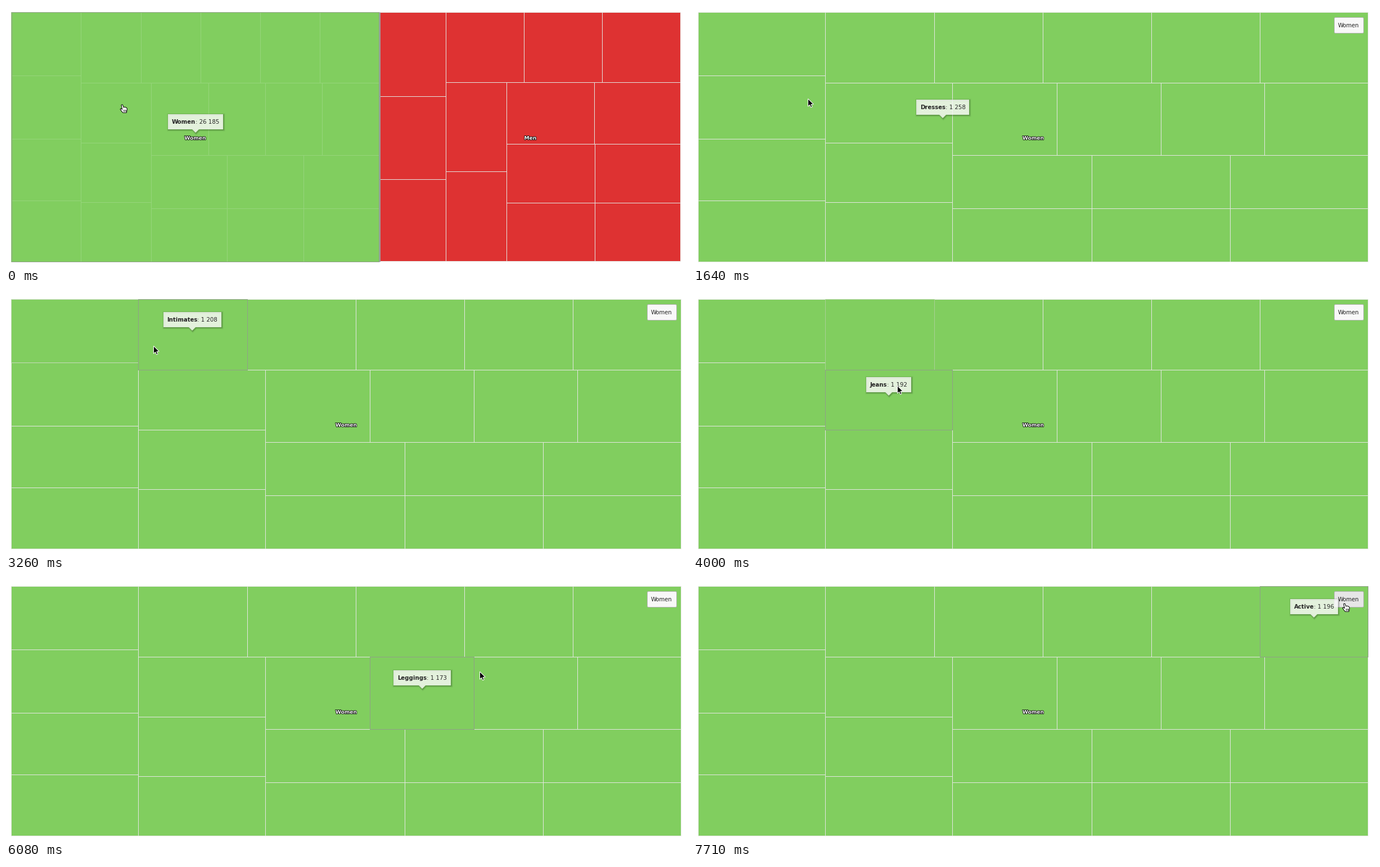
Recreate the animation shown at these times as a matplotlib script. Size 1211 by 462 pixels, loop 8 s.

```python
import numpy as np
import matplotlib.pyplot as plt
from matplotlib.animation import FuncAnimation
from matplotlib.collections import PolyCollection
from matplotlib.colors import to_rgba
from matplotlib.patches import FancyBboxPatch, Polygon
from matplotlib.patheffects import withStroke

W, H, DPI = 1211, 462, 64
PX = 72 / DPI
LOOP, INTERVAL, STEPS = 8000, 40, 54
DRILL, MOVE, PRESS = 5, 11, 50

GREEN, RED = "#81ce5f", "#de3232"
LIGHT, FAINT, HOVER, FADE = "#e4e6e2", "#96d57b", "#8f9f88", "#8ac36e"


def treemap(x, y, w, h, values, strips):
    """Cut strips off a rectangle: columns for n > 0, rows for n < 0."""
    out, values = [], list(values)
    for n in strips:
        part, rest = values[:abs(n)], values[abs(n):]
        share = sum(part) / sum(values)
        ends = np.cumsum([0] + part) / sum(part)
        if n > 0:
            cut = w * share
            out += [(x, y + a * h, x + cut, y + b * h)
                    for a, b in zip(ends, ends[1:])]
            x, w = x + cut, w - cut
        else:
            cut = h * share
            out += [(x + a * w, y, x + b * w, y + cut)
                    for a, b in zip(ends, ends[1:])]
            y, h = y + cut, h - cut
        values = rest
    return out


SALES = np.interp(range(22), [0, 1, 2, 4, 12, 13, 21],
                  [1259, 1258, 1228, 1208, 1183, 1173, 1152])
MEN_SALES = np.interp(range(14), [0, 2, 8, 13], [1768, 1724, 1708, 1560])
WOMEN = treemap(9, 11, 1191, 445, SALES, [4, -5, 3, -4, 2, 2, 2])
MEN = treemap(663.6, 11, 535.4, 444, MEN_SALES, [3, -3, 2, -2, 2, 2])
NAMES = {0: "Maternity", 1: "Dresses", 4: "Intimates", 8: "Active", 9: "Jeans",
         12: "Pants & Capris", 13: "Leggings", 14: "Shorts"}

# step, x, y
PATH = np.array([
    (0, 208, 175), (1, 212, 176), (10, 212, 176), (11, 204, 165),
    (14, 182, 106), (18, 234, 88), (22, 262, 94), (25, 304, 152),
    (32, 509, 197), (41, 842, 163), (44, 1020, 137), (49, 1150, 51),
    (52, 1160, 41)]).T

ARROW = np.array([(0, 0), (0, 13.6), (3.1, 10.8), (5.2, 15.4), (7.5, 14.4),
                  (5.5, 9.9), (9.8, 9.7)])
HAND = np.array([(-3.5, 1.2), (-2.2, .3), (-.8, 1.2), (.6, 5.4), (2, 4.8),
                 (4.4, 5.2), (6.4, 6.6), (7, 8.5), (5.8, 14.8), (-.8, 14.8),
                 (-5.2, 9.2), (-5, 7.6), (-3.4, 7.8), (-1.8, 9)])
GAP = (np.nan, np.nan)
KNUCKLES = np.array([p for x in (.8, 2.7, 4.6)
                     for p in ((x, 9), (x, 12.5), GAP)])


def cursor(k):
    return np.array([np.interp(k, PATH[0], c) for c in PATH[1:]])


def box_at(x, y):
    return next(i for i, (x0, y0, x1, y1) in enumerate(WOMEN)
                if x0 <= x < x1 and y0 <= y < y1)


def find_hovers():
    """Steps at which the cursor enters another box, slightly late."""
    out = {}
    for k in range(MOVE, PRESS):
        box = box_at(*cursor(k - .6))
        if not out or box != list(out.values())[-1]:
            out[k] = box
    return out


HOVERS = find_hovers()


def spaced(n):
    return f"{n:,.0f}".replace(",", " ")


def track_tooltip():
    """The tooltip closes a fixed share of its distance on every tick."""
    x, y = tx, ty = 337, 226
    text = ("Women", spaced(sum(SALES)))
    out = []
    for k in range(STEPS):
        if k == DRILL:
            tx, ty = 605, 227
        if k in HOVERS:
            box = HOVERS[k]
            x0, y0, x1, y1 = WOMEN[box]
            tx, ty = (x0 + x1) / 2 + .5, (y0 + y1) / 2 - 7.2
            text = (NAMES.get(box, "Other"), spaced(SALES[box]))
        for _ in range(1 if k in HOVERS else 4):
            x, y = (2 * x + tx) / 3, (y + ty) / 2
        out.append((x, round(y), *text))
    return out


TIPS = track_tooltip()


def mix(a, b, t):
    return tuple(np.array(to_rgba(a)) * (1 - t) + np.array(to_rgba(b)) * t)


def corners(r):
    x0, y0, x1, y1 = np.round(r) + .5
    return [(x0, y0), (x1, y0), (x1, y1), (x0, y1)]


def grow(k, lag=0):
    """Drilldown progress with a sine ease."""
    p = np.clip((k - DRILL) * .296 + .187 - lag, 0, 1)
    return .5 - .5 * np.cos(np.pi * p) if k >= DRILL else 0


def zoomed(r, e):
    s = .549 + .451 * e
    return (10 + (r[0] - 10) * s, r[1], 10 + (r[2] - 10) * s, r[3])


def box_styles(k):
    """Rectangles in paint order with fill, edge and line width."""
    if k < DRILL:
        items = [(zoomed(r, 0), GREEN, FAINT, 1) for r in WOMEN]
        items += [(r, RED, LIGHT, 1) for r in MEN]
        items.append(((664, 11, 664, 456), "none", "#9c9c9c", 3))
        items.append(((10, 11, 663, 456), "none", HOVER, 1))
        return items
    items = [(zoomed(r, grow(k, .00022 * i)), GREEN, LIGHT, 1)
             for i, r in enumerate(WOMEN)]
    starts = [s for s in HOVERS if s <= k]
    for s, end in zip(starts, starts[1:]):
        age = k - end
        if 0 < age < 4:
            edge = mix(FADE, LIGHT, (age - 1) / 3)
            items.append((WOMEN[HOVERS[s]], "none", edge, 1))
    if starts and k > starts[-1]:
        items.append((WOMEN[HOVERS[starts[-1]]], "none", HOVER, 1))
    return items


fig = plt.figure(figsize=(W / DPI, H / DPI), dpi=DPI, facecolor="white")
ax = fig.add_axes([0, 0, 1, 1])
ax.set_xlim(0, W)
ax.set_ylim(H, 0)
ax.axis("off")


def text(x, y, s, size, z, **kw):
    kw = {"color": "#262626", "family": "DejaVu Sans", **kw}
    return ax.text(x, y, s, fontsize=size * PX, va="baseline", zorder=z, **kw)


def poly(z, **kw):
    return ax.add_patch(Polygon([(0, 0), (1, 0), (1, 1)], zorder=z, **kw))


boxes = ax.add_collection(PolyCollection([], zorder=1, snap=False),
                          autolim=False)

outline = [withStroke(linewidth=1.7 * PX, foreground="black")]
label = {"weight": "bold", "color": "white", "ha": "center",
         "path_effects": outline}
women = text(336.5, 238.5, "Women", 9.1, 3, **label)
men = text(932.5, 238.5, "Men", 9.1, 3, **label)

button = ax.add_patch(FancyBboxPatch(
    (1140.5, 20.5), 52, 28, boxstyle="round,pad=0,rounding_size=2",
    ec="#b4b4b4", lw=PX, zorder=4, snap=False))
caption = text(1166, 38, "Women", 10.1, 5, ha="center")

shadows = [poly(6, fc="none", ec=(0, 0, 0, a), lw=w * PX, snap=False)
           for a, w in ((.05, 5), (.1, 3), (.15, 1))]
bubble = poly(7, fc=(.976, .976, .976, .82), ec="none", snap=False)
name = text(0, 0, "", 10.1, 8, weight="bold")
value = text(0, 0, "", 10.3, 8)

arrow = poly(10, fc="black", ec="white", lw=PX, joinstyle="miter")
hand = poly(10, fc="white", ec="black", lw=PX, joinstyle="round")
knuckles, = ax.plot([], [], color="black", lw=.8 * PX, zorder=11)


def show_tooltip(x, y, title, number):
    name.set_text(title)
    value.set_text(": " + number)
    w1, w2 = (t.get_window_extent().width for t in (name, value))
    start = x - (w1 + w2) / 2
    name.set_position((start, y - 16))
    value.set_position((start + w1, y - 16))

    left, right = round(start - 6.5), round(start + w1 + w2 + 6.5)
    top, low, x = y - 33, y - 6, round(x)
    shape = np.array([(left, top), (right, top), (right, low), (x + 6, low),
                      (x, y), (x - 6, low), (left, low)])
    bubble.set_xy(shape)
    for s in shadows:
        s.set_xy(shape + 1)


def update(i):
    k = min(STEPS - 1, int((i * INTERVAL + 25) * STEPS / LOOP))
    rects, fills, edges, widths = zip(*box_styles(k))
    boxes.set_verts([corners(r) for r in rects])
    boxes.set_facecolor([to_rgba(c) for c in fills])
    boxes.set_edgecolor([to_rgba(c) for c in edges])
    boxes.set_linewidth([w * PX for w in widths])

    drilled, pointing = k >= DRILL, k == 0 or k >= PRESS
    women.set_x(336.5 + 268.5 * grow(k))
    men.set_visible(not drilled)
    button.set_visible(drilled)
    caption.set_visible(drilled)
    button.set_facecolor("#e6e6e6" if k >= PRESS else "#f8f8f8")
    show_tooltip(*TIPS[k])

    spot = np.round(cursor(k)) + .5
    arrow.set_xy(ARROW + spot)
    hand.set_xy(HAND + spot)
    knuckles.set_data(*(KNUCKLES + spot).T)
    arrow.set_visible(not pointing)
    hand.set_visible(pointing)
    knuckles.set_visible(pointing)
    return []


anim = FuncAnimation(fig, update, frames=LOOP // INTERVAL, interval=INTERVAL,
                     init_func=lambda: update(0), repeat=True, repeat_delay=0)
plt.show()
```
